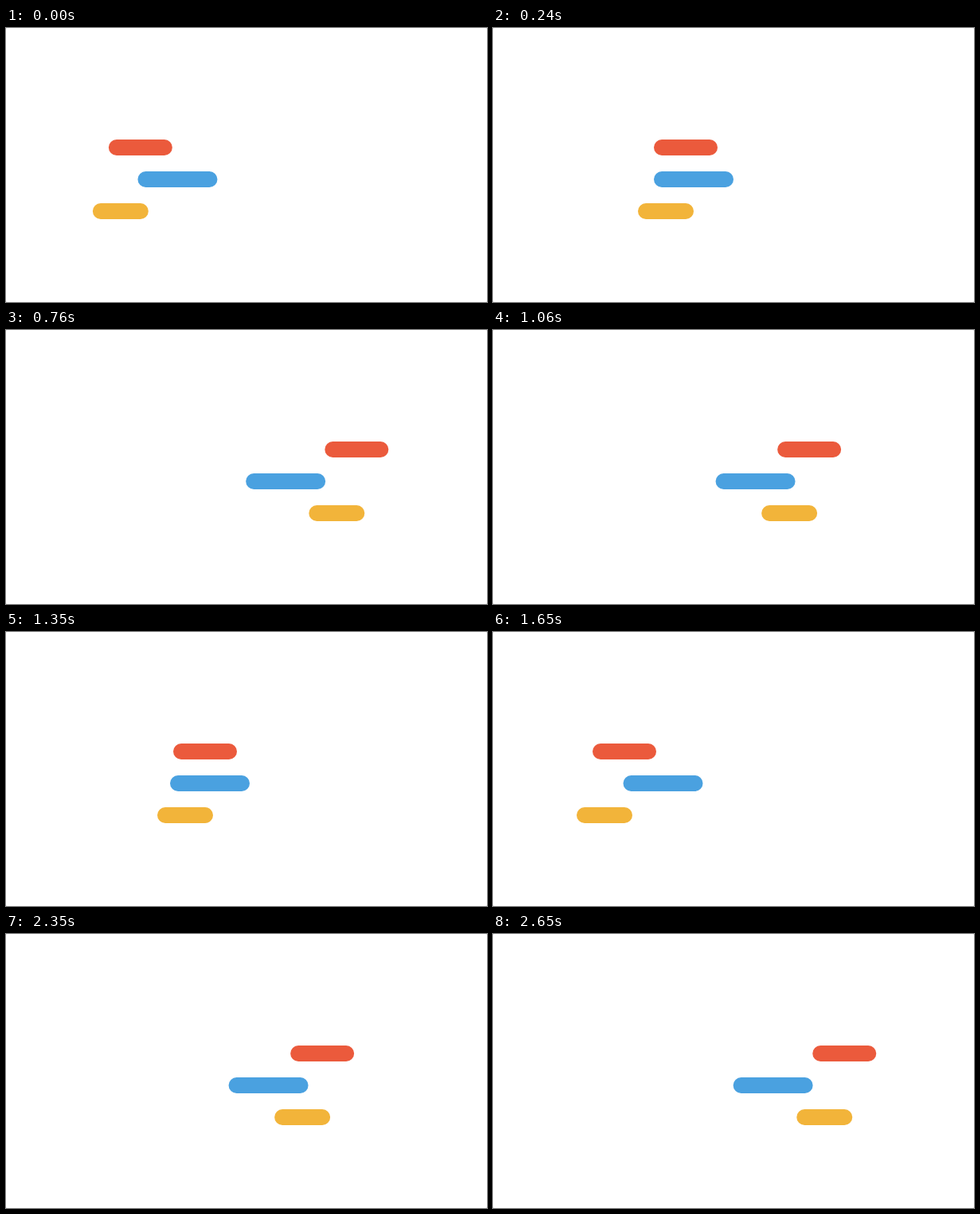
Animation, 604 px wide and 344 px high, one loop 3.65 s. Source, as an HTML page:

```html
<!DOCTYPE html>
<html lang="en">
<head>
<meta charset="utf-8">
<title>Sliding bars</title>
<style>
  html, body { margin: 0; width: 100%; height: 100%; overflow: hidden; background: #e4e4e4; }
  svg { display: block; width: 604px; height: 344px; background: #fff; border-radius: 2px; }
</style>
</head>
<body>
<svg viewBox="0 0 604 344">
  <rect y="140" width="80" height="20" rx="10" fill="#eb5a3c"/>
  <rect y="180" width="100" height="20" rx="10" fill="#4aa1e0"/>
  <rect y="220" width="70" height="20" rx="10" fill="#f2b43a"/>
</svg>
<script>
const LOOP = 3650, LAST = 45, FPS = 17, SWING = 0.9, LEAD = 0.1;
const bars = [...document.querySelectorAll('rect')];
const starts = [122, 162, 102], travel = [280, 140, 280];

// cubic-bezier(.42, 0, .58, 1), solved by bisection
function easeInOut(x) {
  let lo = 0, hi = 1;
  for (let i = 0; i < 30; i++) {
    const s = (lo + hi) / 2;
    if (1.26 * s - 0.78 * s * s + 0.52 * s ** 3 < x) lo = s; else hi = s;
  }
  return lo * lo * (3 - 2 * lo);
}

// 17 steps a second, each snapped to a 60 Hz tick; the last one holds
function stepTime(ms) {
  const t = Math.floor((ms % LOOP) / 10) * 10;
  const step = Math.min(LAST, Math.floor((t + 5) * FPS / 1000));
  return Math.floor(step * 60 / FPS) / 60;
}

function draw(ms) {
  const swing = (stepTime(ms) + LEAD) / SWING % 2;
  const p = easeInOut(swing < 1 ? swing : 2 - swing);
  bars.forEach((bar, i) => bar.setAttribute('x', starts[i] + travel[i] * p));
}

function tick(now) {
  draw(now);
  requestAnimationFrame(tick);
}

draw(0);
requestAnimationFrame(tick);
</script>
</body>
</html>
```
